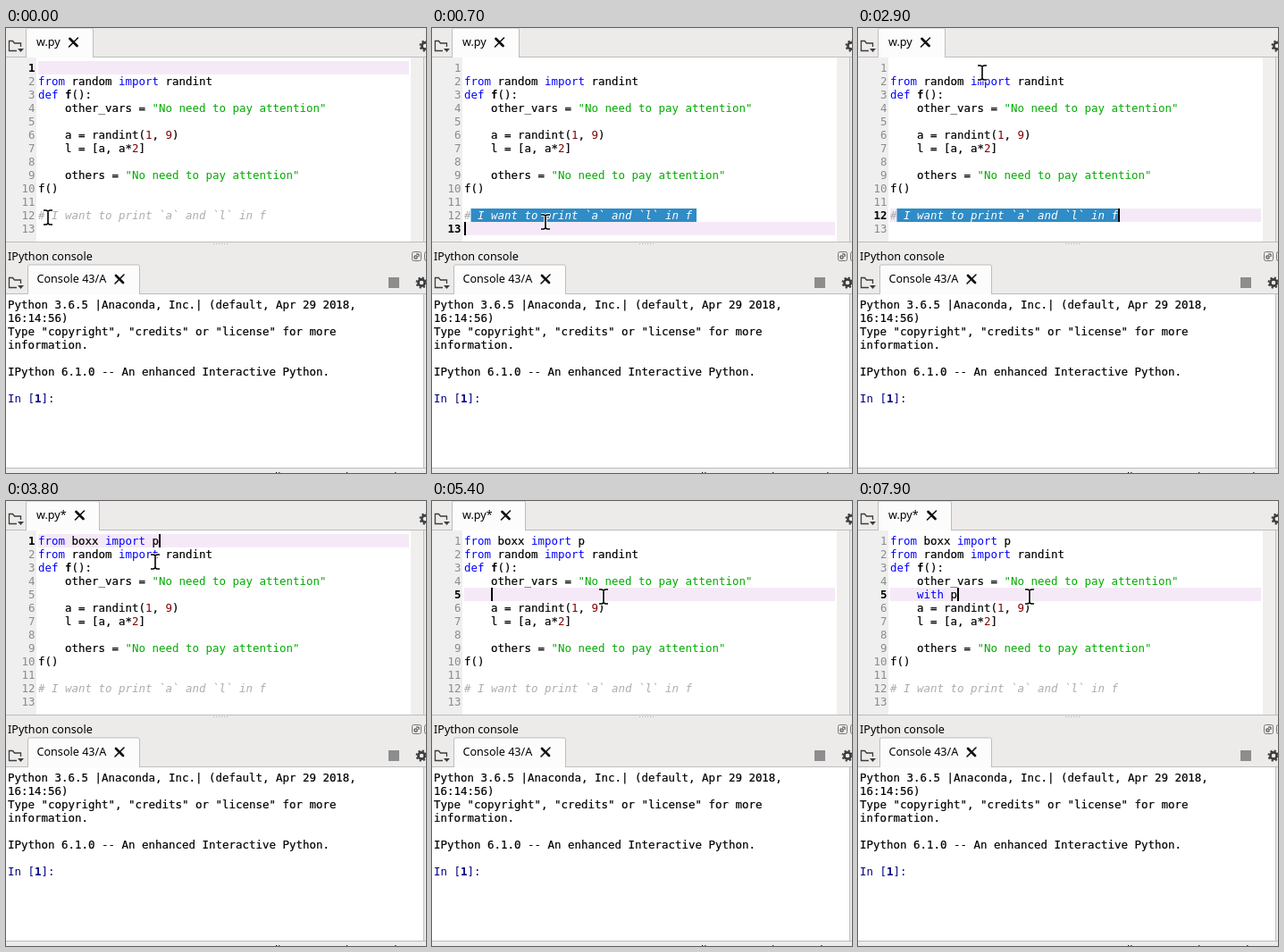
Write an HTML page that moves like this. It is 470x498 px and loops after 8000 ms.

```html
<!DOCTYPE html>
<html lang="en">
<head>
<meta charset="utf-8">
<title>Editor session</title>
<style>
  html, body { margin: 0; width: 100%; height: 100%; overflow: hidden; background: #edebea; }
  svg { display: block; }
  text { white-space: pre; }
  .mono { font: 12.46px "DejaVu Sans Mono", monospace; }
  .mono text { stroke: #000; stroke-width: .2; }
  .mono tspan { stroke: none; }
  .ui { font: 12.6px "Noto Sans", "Open Sans", sans-serif; }
  .mono .num { fill: #8c8c8c; stroke: none; text-anchor: end; }
  .mono .num.on { fill: #000; font-weight: bold; }
  .kw { fill: #0000ff; }
  .str { fill: #00aa00; }
  .lit { fill: #800000; }
  .com { fill: #adadad; font-style: italic; }
  .fn { font-weight: bold; }
  .prompt { fill: #000080; }
  .edge { fill: none; stroke: #bdbdbd; }
  .tab { fill: #fcfcfc; stroke: #bdbdbd; }
  .dark { fill: none; stroke: #3c3c3c; }
</style>
</head>
<body>
<svg width="470" height="498" viewBox="0 0 470 498">
  <defs>
    <g id="cross" fill="none" stroke="#111" stroke-linecap="round">
      <path d="M-4-4L4 4" stroke-width="2.8"/>
      <path d="M5-5L-5 5" stroke-width="1.6"/>
    </g>
    <g id="folder" class="dark">
      <path d="M12 25.5H3.5V14.500h4l2 2.500h7v4" stroke-width="1.300"/>
      <path d="M13 23h7l-3.500 4z" fill="#3c3c3c" stroke="none"/>
    </g>
    <g id="gear" class="dark">
      <circle r="3.600" stroke-width="2.600"/>
      <circle r="5.500" stroke-width="2" stroke-dasharray="2.160 2.160"/>
    </g>
    <g id="float" class="dark">
      <rect x=".5" y=".5" width="10" height="10" rx="2" stroke="#777"/>
      <path d="M3 5h3v3h-3zM5 3h3v3"/>
    </g>
    <path id="beam" d="M-5-8h3l2 1 2-1h3M0-7V7M-5 8h3l2-1 2 1h3"/>
    <clipPath id="sel"><rect id="selClip" y="202" height="15"/></clipPath>
  </defs>

  <!-- editor tabs -->
  <path class="edge" d="M0 32.5H470"/>
  <path id="tab" class="tab"/>
  <use href="#folder"/>
  <text id="title" class="ui" x="34" y="20"></text>
  <use id="close" href="#cross" y="16"/>
  <use href="#gear" x="469" y="20"/>

  <!-- editor -->
  <rect y="33" width="34" height="206" fill="#efefef"/>
  <rect x="34" y="33" width="419" height="206" fill="#fff"/>
  <rect x="453" y="33" width="14" height="206" fill="#f0efee"/>
  <path class="edge" d="M467.5 33V239M0 239.5H470"/>
  <rect id="band" x="36" width="415" height="15" fill="#f5e9f7"/>
  <g id="nums" class="mono"></g>
  <g id="code" class="mono"></g>
  <rect id="selBox" y="202" height="15" fill="#308cc6"/>
  <text id="selText" class="mono com" x="36" y="214" style="fill:#fff" clip-path="url(#sel)"></text>
  <rect id="caret" width="2" height="15"/>

  <!-- console -->
  <path d="M232 241.5h18" stroke="#b0b0b0" stroke-dasharray="1 2"/>
  <text class="ui" x="2" y="259.5">IPython console</text>
  <use href="#float" x="454" y="250"/>
  <use href="#float" x="468" y="250"/>
  <path class="edge" d="M0 297.5H470"/>
  <path class="tab" d="M24.5 298V267q0-2 2-2h121q2 0 2 2V298"/>
  <use href="#folder" y="265"/>
  <text class="ui" x="34.5" y="284.5">Console 43/A</text>
  <use href="#cross" x="127" y="281"/>
  <rect x="428" y="279" width="12" height="12" fill="#8d8d8d"/>
  <use href="#gear" x="465" y="285"/>
  <rect y="298" width="467" height="194" fill="#fff"/>
  <path class="edge" d="M467.5 298V492M0 492.5H470"/>
  <g id="shell" class="mono"></g>
  <text id="status" class="ui" x="268" y="507"></text>

  <g id="mouse" fill="none">
    <use href="#beam" stroke="#fff" stroke-width="3.500"/>
    <use href="#beam" stroke="#000" stroke-width="1.600"/>
  </g>
</svg>
<script>
const $ = id => document.getElementById(id);
const LOOP = 8000, STEP = 100, CHAR = 7.5, ROW = 15, LEFT = 36, TOP = 37;
const rowTop = line => TOP + (line - 1) * ROW;
const colX = col => LEFT + col * CHAR;
const note = "# I want to print `a` and `l` in f";

// markup: {class|text}
const styled = s => s.replace(/\{(\w+)\|([^}]*)\}/g, '<tspan class="$1">$2</tspan>');
const pasted = "{kw|from} boxx {kw|import} p";
const lines = [
  "", "{kw|from} random {kw|import} randint", "{kw|def} {fn|f}():",
  '    other_vars = {str|"No need to pay attention"}', "",
  "    a = randint({lit|1}, {lit|9})", "    l = [a, a*{lit|2}]", "",
  '    others = {str|"No need to pay attention"}', "f()", "", `{com|${note}}`, ""
];
const shell = [
  "Python 3.6.5 |Anaconda, Inc.| (default, Apr 29 2018,", "16:14:56)",
  'Type "copyright", "credits" or "license" for more', "information.", "",
  "IPython 6.1.0 -- An enhanced Interactive Python.", "",
  '{prompt|In [}<tspan class="prompt fn">1</tspan>{prompt|]:}'
];
const row = (s, x, y) => `<text x="${x}" y="${y}">${styled(s)}</text>`;
$("code").innerHTML = lines.map((s, i) => row(s, LEFT, rowTop(i + 1) + 12)).join("");
$("nums").innerHTML = lines.map((s, i) =>
  `<text class="num" x="32.5" y="${rowTop(i + 1) + 12}">${i + 1}</text>`).join("");
$("shell").innerHTML = shell.map((s, i) => row(s, 2, 314 + i * ROW)).join("");
$("selText").textContent = note;
const codeRows = $("code").children, numRows = $("nums").children;

const DRAG = 400, DROP = 1200, HOME = 3200, PASTE = 3600, CLICK = 4500;
const word = "with p", keyTimes = [6000, 6600, 6800, 6900, 7000, 7300];
const moves = [
  { from: DRAG, to: 1250, x: 326, y: 212, sag: 6.5 },
  { from: 1500, to: 2400, x: 140, y: 53 },
  { from: 2800, to: 2900, x: 139, y: 50 },
  { from: 3500, to: 3800, x: 167, y: 68 },
  { from: 3800, to: 4400, x: 192, y: 107 }
];

function mouseAt(t) {
  let x = 47, y = 212;
  for (const m of moves) {
    const f = Math.min(1, Math.max(0, (t - m.from) / (m.to - m.from)));
    const e = f * f * (3 - 2 * f);
    x += (m.x - x) * e;
    y += (m.y - y) * e + (m.sag || 0) * Math.sin(Math.PI * e);
  }
  return { x: Math.round(x), y: Math.round(y) };
}

// caret position, and the time of the last action that moved it
function caretAt(t) {
  if (t < DRAG) return { line: 1, col: 0, acted: -600 };
  if (t < HOME) {
    const acted = Math.min(t, DROP), m = mouseAt(acted);
    const line = Math.floor((m.y - TOP) / ROW) + 1;
    const col = line === 12 ? Math.min(note.length, Math.round((m.x - LEFT) / CHAR)) : 0;
    return { line, col, acted };
  }
  if (t < PASTE) return { line: 1, col: 0, acted: HOME };
  if (t < CLICK) return { line: 1, col: 18, acted: PASTE };
  const keys = keyTimes.filter(k => k <= t);
  return { line: 5, col: 4 + keys.length, acted: keys.at(-1) || CLICK };
}

// the blink clock runs freely; every action turns the caret on
const blinks = t => Math.floor((t + 100) / 500);

function set(el, attrs) {
  for (const k in attrs) el.setAttribute(k, attrs[k]);
}

function draw(ms) {
  const t = Math.floor(ms / STEP) * STEP;
  const { line, col, acted } = caretAt(t), mouse = mouseAt(t);
  const lit = (blinks(t) - blinks(acted)) % 2 === 0;
  const dirty = t >= PASTE, right = dirty ? 104.5 : 97.5;

  set($("mouse"), { transform: `translate(${mouse.x} ${mouse.y})` });
  set($("band"), { y: rowTop(line) });
  [...numRows].forEach((n, i) => n.classList.toggle("on", i + 1 === line));
  set($("caret"), { x: Math.floor(colX(col)), y: rowTop(line), opacity: lit ? 1 : 0 });

  const selecting = t >= DRAG && t < HOME;
  const end = line === 13 ? colX(note.length) + 5 : colX(col);
  const sel = { x: colX(1), width: selecting ? Math.max(0, end - colX(1)) : 0 };
  set($("selBox"), sel);
  set($("selClip"), sel);

  const typed = line === 5 ? word.slice(0, col - 4) : "";
  codeRows[0].innerHTML = dirty ? styled(pasted) : "";
  codeRows[4].innerHTML = "    " + styled(typed.replace("with", "{kw|with}"));

  $("title").textContent = dirty ? "w.py*" : "w.py";
  set($("close"), { x: right - 22 });
  set($("tab"), { d: `M22.5 33V2q0-2 2-2H${right - 2}q2 0 2 2V33` });
  $("status").textContent = `Encoding: UTF-8   Line: ${line}  Col: ${col + 1}`;
}

function tick(now) {
  draw(now % LOOP);
  requestAnimationFrame(tick);
}
draw(0);
requestAnimationFrame(tick);
</script>
</body>
</html>
```
